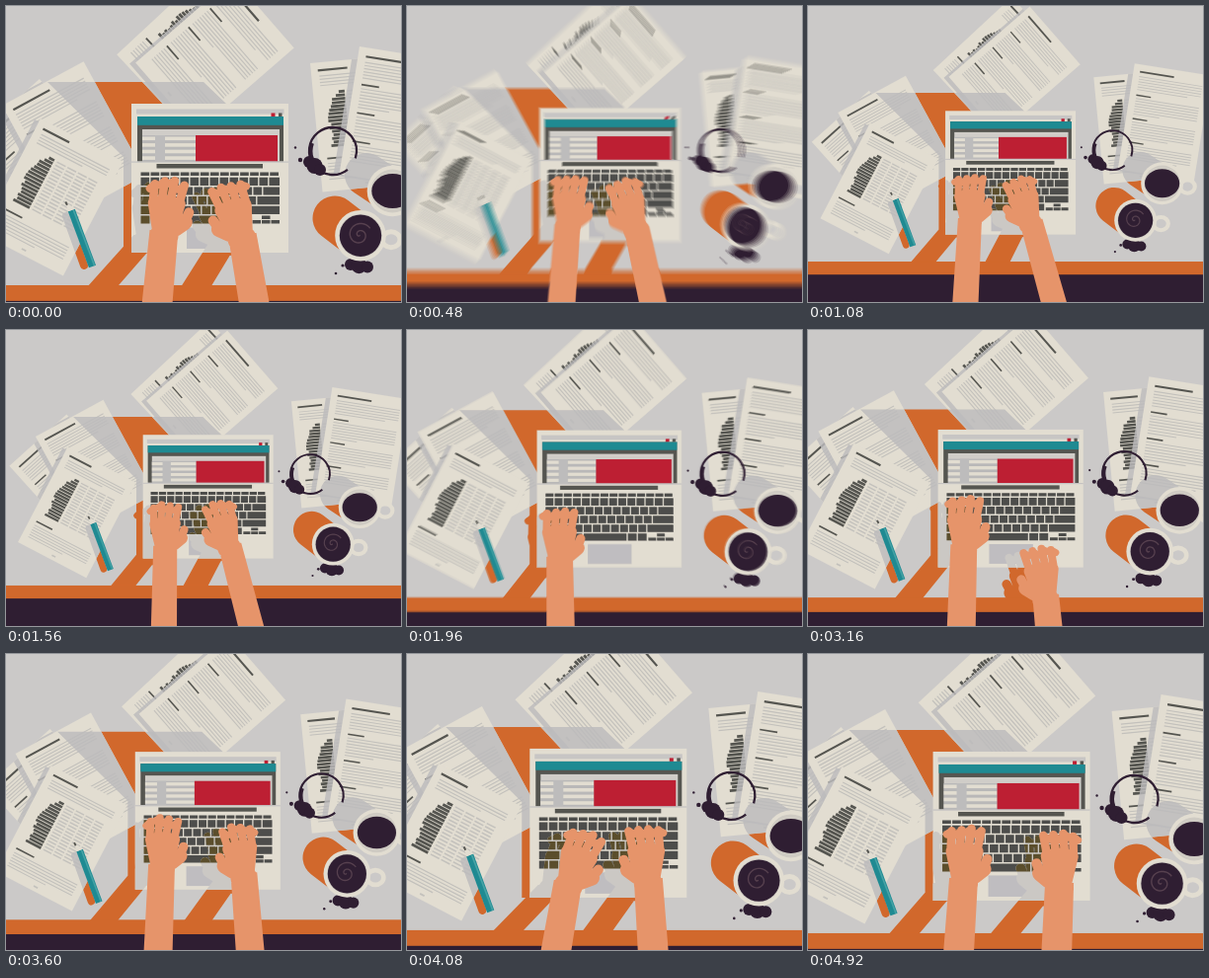
These frames come from a looping animation (400 px wide and 300 px high, 5000 ms). An HTML page with a canvas:

```html
<!DOCTYPE html>
<html lang="en">
<head>
<meta charset="utf-8">
<title>Desk</title>
<style>
html, body { margin: 0; width: 100%; height: 100%; overflow: hidden; background: #cbc9c8; }
canvas { display: block; width: 400px; height: 300px; }
</style>
</head>
<body>
<canvas id="stage" width="400" height="300"></canvas>
<script>
const LOOP = 5000;
const CREAM = '#e2ddd1', DESK = '#cbc9c8', ORANGE = '#d1682c', COFFEE = '#2f1e32',
      TEAL = '#1f8a92', RED = '#bd1f33', DARK = '#555550', LINE = '#c3c1bc',
      SKIN = '#e6946a', TINT = 'rgba(188,187,188,.82)';

const screen = document.getElementById('stage').getContext('2d');
const buffer = document.createElement('canvas');
buffer.width = 400;
buffer.height = 300;
const c = buffer.getContext('2d');

// ---- Motion ----
const smooth = p => p * p * (3 - 2 * p);
const ease = (t, from, to) => smooth(Math.min(1, Math.max(0, (t - from) / (to - from))));
const bump = (t, mid, half) => 1 - ease(Math.abs(t - mid), 0, half);

function camera(time) {
  const t = (time + LOOP) % LOOP;
  return {
    zoom: 1 - .17 * ease(t, 300, 620) + .095 * ease(t, 1760, 1980) + .075 * ease(t, 3680, 3920),
    x: -2.7 * bump(t, 4100, 1100) - 1.4 * bump(t, 2400, 1300),
    y: -3.5 * bump(t, 3840, 1150) - .8 * bump(t, 1960, 500)
  };
}

// poses: time, wrist x, wrist y, turn; the arm swings about its elbow
const HANDS = [
  { side: 1, elbow: 153, leave: 1960, back: 2860,
    poses: [[0, 160, 233, 3], [1080, 157, 236, -2], [1960, 152, 244, -2],
            [3600, 156, 228, 0], [4080, 166, 238, 18], [4920, 158, 233, 0]] },
  { side: -1, elbow: 252, leave: 1600, back: 2960,
    poses: [[0, 239, 236, -14], [1080, 231, 237, -14], [3600, 246, 237, -6],
            [4080, 247, 236, -2], [4920, 255, 238, 2]] }
];

function poseAt({ poses, leave, back }, t) {
  const i = poses.findLastIndex(p => p[0] <= t);
  const a = poses[i], b = poses[(i + 1) % poses.length];
  const p = ease(t, a[0], b[0] || LOOP);
  const [x, y, turn] = [1, 2, 3].map(k => a[k] + (b[k] - a[k]) * p);
  const drop = 190 * (ease(t, leave, leave + 260) - ease(t, back, back + 300));
  return { x, y: y + drop, turn: turn * Math.PI / 180 };
}

// ---- Drawing helpers ----
function random(seed) {
  return () => (seed = (seed * 16807) % 2147483647) / 2147483647;
}

const box = (color, x, y, w, h) => { c.fillStyle = color; c.fillRect(x, y, w, h); };

function disc(color, x, y, rx, ry = rx) {
  c.fillStyle = color;
  c.beginPath();
  c.ellipse(x, y, rx, ry, 0, 0, 7);
  c.fill();
}

function line(color, width, x1, y1, x2, y2) {
  c.strokeStyle = color;
  c.lineWidth = width;
  c.beginPath();
  c.moveTo(x1, y1);
  c.lineTo(x2, y2);
  c.stroke();
}

function arc(color, width, x, y, rx, ry, from = 0, to = 7) {
  c.strokeStyle = color;
  c.lineWidth = width;
  c.beginPath();
  c.ellipse(x, y, rx, ry, 0, from, to);
  c.stroke();
}

function poly(path, ...p) {
  path.moveTo(p[0], p[1]);
  for (let i = 2; i < p.length; i += 2) path.lineTo(p[i], p[i + 1]);
  path.closePath();
}

function capsule(path, x1, y1, x2, y2, r) {
  const a = Math.atan2(y2 - y1, x2 - x1), q = Math.PI / 2;
  path.moveTo(x1 + r * Math.cos(a + q), y1 + r * Math.sin(a + q));
  path.arc(x1, y1, r, a + q, a + 3 * q);
  path.arc(x2, y2, r, a - q, a + q);
  path.closePath();
}

// ---- Papers: x, y, turn, page ----
const PAPERS = [
  [208, -40, 47, chartPage], [230, -28.5, 49, textPage],
  [308, 58, -5.5, chartPage], [358, 41, 9, textPage],
  [-36, 137, -42, textPage], [-4, 101, -28.5, textPage], [35, 114, 27.5, chartPage]
].map(([x, y, turn, page]) => {
  const m = new DOMMatrix().translate(x, y).rotate(turn);
  const sheet = new Path2D(), rect = new Path2D();
  rect.rect(0, 0, 94, 131);
  sheet.addPath(rect, m);
  return { m, sheet, page };
});
const allPapers = new Path2D();
PAPERS.forEach(p => allPapers.addPath(p.sheet));

function textLines(y, count, last) {
  for (let i = 0; i < count; i++)
    line(LINE, 1.2, 8, y + i * 3.2, i === count - 1 ? last : 86, y + i * 3.2);
}

function chartPage() {
  box(DARK, 7, 7, 30, 2.2);
  textLines(14, 4, 60);
  const rnd = random(41);
  for (let i = 0; i < 16; i++) {
    const y = 30 + i * 3.6, w = 6 + 9 * Math.min(1, i / 7) + 5 * rnd();
    box(DARK, 32 - w, y, w, 2.8);
    for (let x = 35; x < 80; x += 12) box(LINE, x, y + .7, 10, 1.5);
  }
  box(DARK, 8, 97, 22, 1.8);
  textLines(103, 6, 55);
  box(LINE, 44, 125, 5, 1.8);
}

function textPage() {
  box(DARK, 8, 8, 42, 2.2);
  textLines(15, 6, 70);
  for (let i = 0; i < 3; i++) {
    box(DARK, 8, 37 + i * 29, 18, 1.7);
    textLines(42 + i * 29, 7 - (i >> 1), 40 + i * 15);
  }
  box(LINE, 44, 125, 5, 1.8);
}

function drawPapers() {
  const below = new Path2D();
  PAPERS.forEach(({ m, sheet, page }) => {
    c.save();
    c.clip(below);
    c.translate(-6, 1);
    c.fillStyle = TINT;
    c.fill(sheet);
    c.restore();
    c.fillStyle = CREAM;
    c.fill(sheet);
    c.save();
    c.transform(m.a, m.b, m.c, m.d, m.e, m.f);
    page();
    c.restore();
    below.addPath(sheet);
  });
}

// ---- Laptop ----
const keys = new Path2D();
(function () {
  const left = 136.5, right = 277;
  for (let i = 0; i < 14; i++) keys.rect(left + i * 10.06, 168.5, 8.7, 3.6);
  for (let r = 0; r < 4; r++) {
    const y = 173.7 + r * 9.7;
    let x = left + 10 + r * 4;
    keys.rect(left, y, x - left - 1.4, 8.2);
    for (let i = r; i < 12; i++, x += 10) keys.rect(x, y, 8.6, 8.2);
    keys.rect(x, y, right - x, 8.2);
  }
  for (let i = 0; i < 4; i++) keys.rect(left + i * 10.4, 212.5, 9, 8);
  keys.rect(178.5, 212.5, 47, 8);
  for (let i = 0; i < 2; i++) keys.rect(227 + i * 11, 212.5, 9.6, 8);
  for (let i = 0; i < 3; i++) keys.rect(249.5 + i * 9.5, 217.1, 8.5, 3.4);
  keys.rect(259, 212.5, 8.5, 3.4);
})();

function drawLaptop(handShadow) {
  box(CREAM, 127, 99, 159, 151);
  box('#c7c5c4', 132, 104.5, 149.5, 5);
  box(RED, 268.5, 108.5, 4, 3.5);
  box(DARK, 276, 108.5, 3.5, 3.5);
  box(DARK, 133, 112, 148, 45.5);
  box(TEAL, 133, 112, 148, 8.8);
  box('#d0cdc8', 138, 125, 139, 32.5);
  box('#b9b8b8', 138, 131, 134, 26.5);
  for (let i = 0; i < 4; i++) box(CREAM, 138, 132.5 + i * 6.6, 54, 3.6);
  box('#bdbcbc', 151, 131, 10, 26.5);
  box(RED, 192, 131, 83, 26.5);
  box('#c4c2c2', 127, 157.5, 159, 1.2);
  box(DARK, 152.5, 160, 107.5, 4.5);
  box('#bfbdc0', 183, 224.5, 48, 21.5);
  c.fillStyle = '#4d4d4b';
  c.fill(keys);

  c.save();
  c.clip(handShadow);
  box('#cbc8c4', 127, 166, 159, 84);
  c.fillStyle = '#5b4e2c';
  c.fill(keys);
  c.restore();
}

// ---- Pen and cups ----
function drawPen() {
  line(TEAL, 7.5, 66.3, 207, 87.5, 264);
  line('#46a3a6', 1.6, 68.3, 207, 89.5, 263);
  const tip = new Path2D();
  poly(tip, 60.3, 198.5, 69.8, 205.7, 62.8, 208.3);
  c.fillStyle = CREAM;
  c.fill(tip);
  line(DARK, 2, 60.3, 198.5, 62, 201.8);
}

// A row of blots along a short line, with two stray drops
function spill(x, y, dx, dy) {
  for (let i = 0; i < 3; i++)
    disc(COFFEE, x + i * dx, y + dy * i, i === 1 ? 8 : 6);
}

function cup(x, y, coffeeHeight) {
  arc(CREAM, 5, x + 31, y + 4, 9, 8);
  disc(CREAM, x, y, 25.8);
  disc('#cfcbc3', x, y, 22);
  disc(COFFEE, x, y, 21.2, coffeeHeight);
}

function drawCups() {
  cup(391.5, 187.5, 17.5);
  spill(349, 262, 8.5, 1.2);
  disc(COFFEE, 341, 263, 1.6);
  disc(COFFEE, 334, 271, 1.3);
  cup(359, 232.7, 21.2);
  c.strokeStyle = '#57414f';
  c.lineWidth = 1.4;
  c.beginPath();
  for (let a = 0; a < 11; a += .2)
    c.lineTo(358 + a * 1.15 * Math.cos(a + 1), 232 + a * 1.15 * Math.sin(a + 1));
  c.stroke();
}

function drawStain() {
  arc(COFFEE, 2.3, 331, 147, 24, 24, .9, 6.6);
  arc(COFFEE, 4, 331.5, 147, 23, 23, 2.1, 3.5);
  spill(307, 158, 5.5, 4);
  disc(COFFEE, 298, 156, 2.2);
  disc(COFFEE, 293, 143.5, 1.2);
}

// ---- Hands ----
function handPath(path, pose, side, t, dx, dy) {
  const cos = Math.cos(pose.turn), sin = Math.sin(pose.turn);
  const at = (x, y) => [pose.x + dx + side * x * cos - y * sin,
                        pose.y + dy + side * x * sin + y * cos];
  const limb = (x1, y1, x2, y2, r) => capsule(path, ...at(x1, y1), ...at(x2, y2), r);
  for (let i = 0; i < 4; i++) {
    const arch = 2.5 * i * (3 - i) / 2;
    const tap = 2 * Math.sin(t / LOOP * 2 * Math.PI * 17 + i * 2.1 + side);
    const jx = -12 + 10 * i, jy = -53 - arch + tap / 2;
    limb(-13 + 9 * i, -35 - arch, jx, jy, 4.3);
    limb(jx, jy, jx - 5, jy + 4 + tap / 2, 3.8);
    limb(-11 + 8 * i, -33 - arch, -5 + 3.5 * i, -4, 7);
  }
  limb(11, -8, 20, -15, 8);
  limb(20, -15, 24, -25, 5);
  limb(-2, 0, 2, 0, 12.5);
}

function armPath(path, pose, elbow, dx, dy, slide) {
  const x = pose.x + dx, y = pose.y + dy;
  const bx = elbow + 1.6 * (elbow - pose.x) + dx - slide, by = y + 190;
  poly(path, x - 14.5, y - 6, x + 14.5, y - 6, bx + 17, by, bx - 17, by);
}

function bothHands(t, dx, dy, slide) {
  const path = new Path2D();
  HANDS.forEach(hand => {
    const pose = poseAt(hand, t);
    handPath(path, pose, hand.side, t, dx, dy);
    armPath(path, pose, hand.elbow, dx, dy, slide);
  });
  return path;
}

// ---- Scene ----
function drawScene(t, view) {
  const handShadow = bothHands(t, -16, 5, 155);
  const shadow = new Path2D();
  poly(shadow, 42, 77, 200, 77, 223, 99, 223, 158, 127, 250, 119, 250, 119, 153);
  capsule(shadow, 359, 235, 333, 215, 22.5);
  capsule(shadow, 392, 189, 365, 171, 22);
  capsule(shadow, 61, 213, 79, 263, 4);
  shadow.addPath(handShadow);

  const z = view.zoom;
  c.setTransform(1, 0, 0, 1, 0, 0);
  box(DESK, 0, 0, 400, 300);
  c.setTransform(z, 0, 0, z, 198 * (1 - z) + view.x, 142 * (1 - z) + view.y);

  c.fillStyle = ORANGE;
  c.fill(shadow);
  drawPapers();
  c.save();
  c.clip(allPapers);
  c.fillStyle = TINT;
  c.fill(shadow);
  c.restore();

  drawStain();
  drawPen();
  box(ORANGE, -100, 283, 600, 17);
  box(COFFEE, -100, 298.9, 600, 100);
  drawLaptop(handShadow);
  drawCups();
  c.fillStyle = SKIN;
  c.fill(bothHands(t, 0, 0, 0));
}

// Fast zooms are averaged over a short shutter
function render(t) {
  const change = Math.abs(camera(t + 30).zoom - camera(t - 30).zoom);
  const n = change > .004 ? 6 : 1;
  for (let i = 0; i < n; i++) {
    drawScene(t, camera(n > 1 ? t - 30 + i * 12 : t));
    screen.globalAlpha = 1 / (i + 1);
    screen.drawImage(buffer, 0, 0);
  }
}

const start = performance.now();
function tick() {
  render((performance.now() - start) % LOOP);
  requestAnimationFrame(tick);
}
tick();
</script>
</body>
</html>
```
